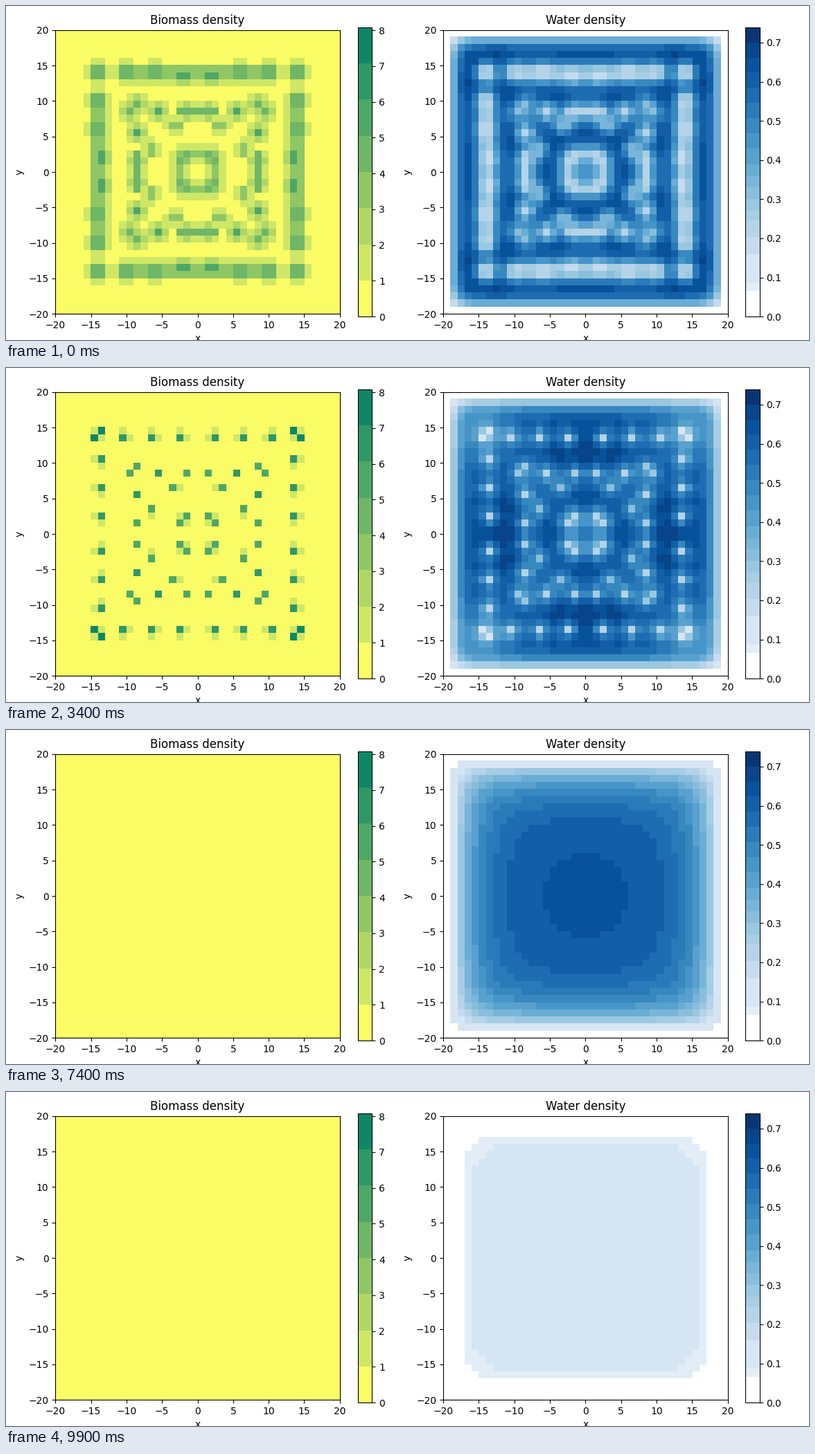
Animation, 1159 px wide and 483 px high, one loop 10000 ms. Source, as a matplotlib script:

```python
import numpy as np
import matplotlib.pyplot as plt
from matplotlib.animation import FuncAnimation
from matplotlib.colors import ListedColormap

WIDTH, HEIGHT, DPI = 1159, 483, 100
FRAMES, INTERVAL = 100, 100
N = 40
DIFFUSION, UPTAKE = 12.0, 1.3
BIOMASS_MAX, WATER_MAX = 8.08, 0.739

# Clumps in one octant: start, resting place, density, lifetime in seconds
CLUMPS = [
    ((14, 14), (13.5, 14.5), 7.6, 4.6),
    ((10, 14), (10.5, 13.5), 6.8, 6.2),
    ((6, 14), (6.5, 13.5), 6.8, 6.1),
    ((2, 13.6), (2.5, 13.5), 6.8, 6.0),
    ((8.5, 9.5), (8.5, 9.5), 4.7, 4.6),
    ((5.5, 8.5), (5.5, 8.5), 6.0, 6.3),
    ((1.5, 8.5), (1.5, 8.5), 5.6, 6.2),
    ((3.1, 6.5), (3.5, 6.5), 5.0, 6.2),
    ((1.8, 2.2), (1.5, 2.5), 5.8, 4.6),
]
# Clumps that outlive their siblings, mirrored over the diagonal
SURVIVORS = [(3.5, 6.5), (-2.5, 1.5), (-5.5, -8.5), (1.5, -8.5),
             (-5.5, 8.5), (-1.5, 8.5), (-8.5, 5.5)]
LAST_DEATH = 6.8

axis = np.arange(N) - N / 2 + 0.5
X, Y = np.meshgrid(axis, axis)


def images(point):
    """The eight mirror images of a point in the octant."""
    for x, y in (point, point[::-1]):
        for sx in (1, -1):
            for sy in (1, -1):
                yield sx * x, sy * y


def smooth(s):
    s = np.clip(s, 0, 1)
    return s * s * (3 - 2 * s)


def band(along, across, centre, width, half_length, level):
    profile = np.exp(-((abs(across) - centre) / width) ** 4)
    return level * profile * (abs(along) < half_length)


def stripes():
    field = 4.6 * np.exp(-((np.hypot(X, Y) - 2.85) / 0.72) ** 2)
    for along, across in ((X, Y), (Y, X)):
        field = np.maximum(field, band(along, across, 13.8, 1.26, 11, 3.6))
        field = np.maximum(field, band(along, across, 8.5, 0.9, 3, 4.5))
    return field


STRIPES = stripes()


def biomass_at(t):
    """Stripes fade while clumps tighten, settle on a cell and die off."""
    field = STRIPES * max(0, 1 - (t / 2.4) ** 2)
    sigma = np.interp(t, [0, 2.2, 3.4, 4.8], [0.85, 0.6, 0.5, 0.3])
    trend = np.interp(t, [0, 2.2, 4.8, 6.4], [0.9, 1.15, 1, 1.15])
    drift = smooth((t - 2.2) / 2)
    for start, rest, density, lifetime in CLUMPS:
        now = [a + (b - a) * drift for a, b in zip(start, rest)]
        for (x, y), home in zip(images(now), images(rest)):
            lasting = home in SURVIVORS or home[::-1] in SURVIVORS
            end = LAST_DEATH if lasting else lifetime
            vigour = max(0, 1 - (t / end) ** 24)
            spread = ((X - x) ** 2 + (Y - y) ** 2) / (2 * sigma ** 2)
            field = np.maximum(field, density * trend * vigour * np.exp(-spread))
    return field


rows, cols = np.indices((N - 2, N - 2))
CHECKER = [(rows + cols) % 2 == parity for parity in (0, 1)]


def water_at(t, biomass):
    """Steady state of rain, evaporation, uptake and diffusion; dry border."""
    left = 9.9 - t
    rain = 0.14 + 0.19 * left + 0.004 * left ** 2
    loss = 4 * DIFFUSION + 1 + UPTAKE * biomass[1:-1, 1:-1] ** 2
    water = np.zeros((N, N))
    inner = water[1:-1, 1:-1]
    for _ in range(70):
        for mask in CHECKER:
            around = (water[:-2, 1:-1] + water[2:, 1:-1]
                      + water[1:-1, :-2] + water[1:-1, 2:])
            target = (rain + DIFFUSION * around) / loss
            inner += 1.6 * mask * (target - inner)
    return water


def water_colours():
    # White and pale steps first, then bands of nearly even width
    edges = np.concatenate([[0, 0.067, 0.087, 0.16, 0.204, 0.245],
                            np.arange(0.27, 0.4, 0.03),
                            np.linspace(0.43, WATER_MAX, 9)])
    shades = plt.get_cmap("Blues")((edges[:-1] + edges[1:]) / 2 / WATER_MAX)
    shades[0] = 1
    values = (np.arange(512) + 0.5) / 512 * WATER_MAX
    return ListedColormap(shades[np.digitize(values, edges) - 1])


def biomass_colours():
    shades = plt.get_cmap("summer_r")((np.arange(8) + 0.5) / 8)
    shades[0] = (0.984, 0.992, 0.4, 1)
    return ListedColormap(shades)


fig = plt.figure(figsize=(WIDTH / DPI, HEIGHT / DPI), dpi=DPI)


def box(left, top, width, height):
    return fig.add_axes([left / WIDTH, 1 - (top + height) / HEIGHT,
                         width / WIDTH, height / HEIGHT])


def panel(title, left, bar_left, cmap, vmax):
    ax = box(left, 34.8, 410.6, 410.4)
    image = ax.imshow(np.zeros((N, N)), cmap=cmap, vmin=0, vmax=vmax,
                      origin="lower", extent=(-20, 20, -20, 20),
                      aspect="auto", interpolation="nearest")
    ticks = range(-20, 21, 5)
    ax.set(title=title, xlabel="x", ylabel="y", xticks=ticks, yticks=ticks)
    fig.colorbar(image, cax=box(bar_left, 30.9, 20.7, 418.3))
    return image


biomass_image = panel("Biomass density", 71.2, 507.6, biomass_colours(), BIOMASS_MAX)
water_image = panel("Water density", 631, 1067.2, water_colours(), WATER_MAX)


def update(frame):
    t = frame * INTERVAL / 1000
    biomass = biomass_at(t)
    biomass_image.set_data(biomass)
    water_image.set_data(water_at(t, biomass))
    return biomass_image, water_image


animation = FuncAnimation(fig, update, frames=FRAMES, interval=INTERVAL,
                          repeat=True, repeat_delay=0)
plt.show()
```
